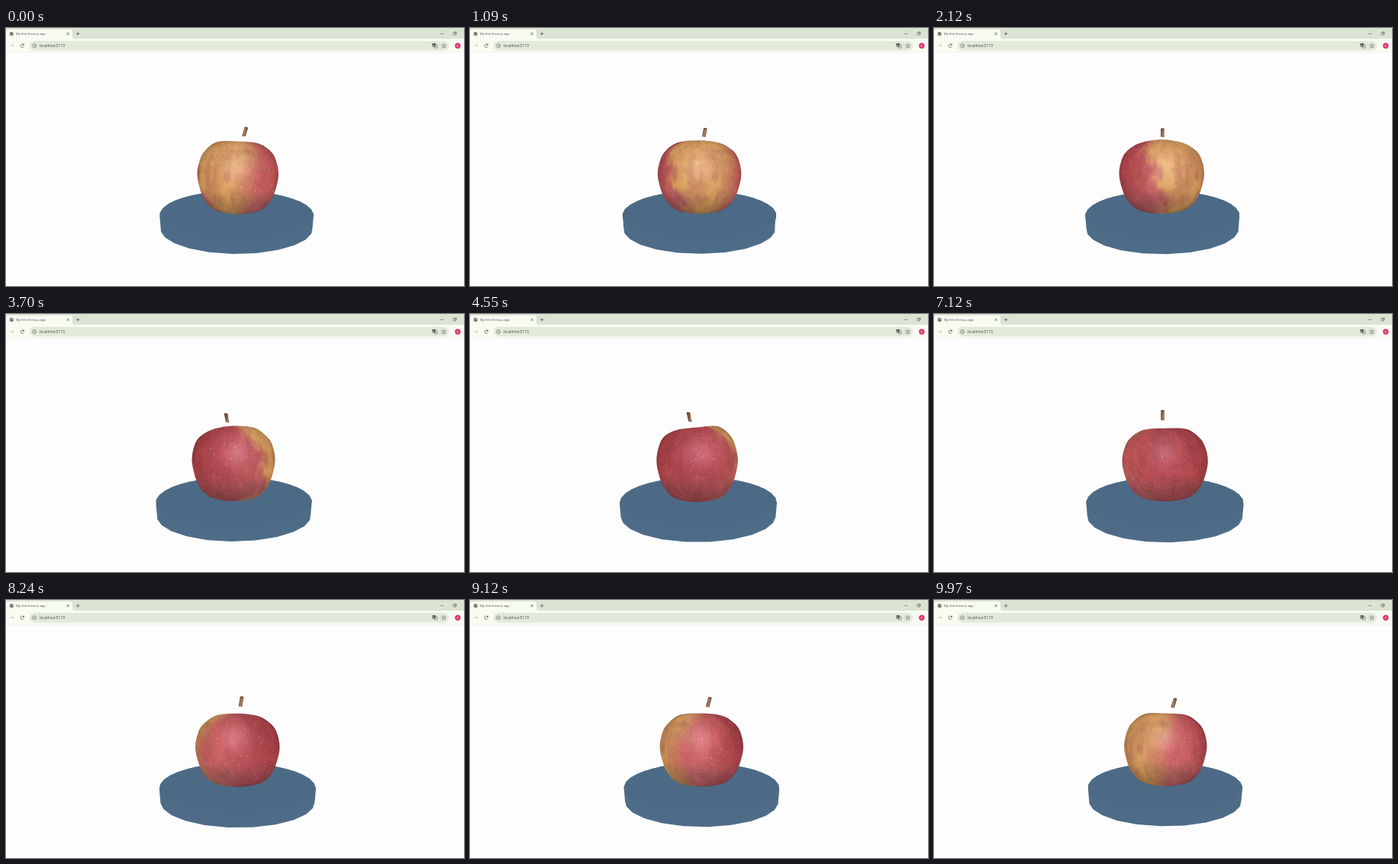
Write an HTML page with a canvas that moves like this. It is 600 px wide and 338 px high and loops after 10 s.

```html
<!DOCTYPE html>
<html lang="en">
<head>
<meta charset="utf-8">
<title>My first three.js app</title>
<style>
html, body { margin: 0; width: 100%; height: 100%; overflow: hidden; background: #fdfdfd; }
canvas, svg { position: absolute; left: 0; top: 0; width: 600px; height: 338px; display: block; }
text { font-family: "Open Sans", "Noto Sans", sans-serif; fill: #43473f; }
.line { fill: none; stroke: #474b43; stroke-width: .7; }
.thin { stroke-width: .55; }
</style>
</head>
<body>
<canvas id="scene" width="600" height="338"></canvas>
<svg viewBox="0 0 600 338">
  <rect width="600" height="15" fill="#dbe4d3"/>
  <rect y="14" width="600" height="17.5" fill="#f8fbf2"/>
  <path d="M0 14.5V4Q0 2 3 2H84Q87 2 87 5V11Q87 14 90 14.5Z" fill="#f8fbf2"/>
  <path d="M0 31.7H600" stroke="#e9ede4" stroke-width=".6"/>
  <rect x="31" y="17" width="549" height="12.4" rx="6.2" fill="#e1ead9"/>
  <circle cx="7.3" cy="7.5" r="2.5" fill="#4a4f48"/>
  <path d="M5.4 6.6L7 7.6 6.6 9.3M8 5.4L8.3 7 9.5 7.6" fill="none" stroke="#eef3e8" stroke-width=".9"/>
  <text x="13" y="9.3" font-size="4.2">My first three.js app</text>
  <path class="line" d="M79.3 5.8L82.7 9.2M82.7 5.8L79.3 9.2M92 7.5H96.4M94.2 5.3V9.7"/>
  <path class="line thin" d="M569 7.5H573M586 6.2H589V9H586ZM587 6V5.2H590V8H589.2"/>
  <path class="line" style="stroke:#b3b9ae" d="M5.6 23H10M8.2 21.2L10 23 8.2 24.8"/>
  <path class="line" d="M23.3 22.2A2.2 2.2 0 1 0 23.3 24.2M23.5 20.7V22.4H21.8"/>
  <circle class="line thin" cx="37.3" cy="23.2" r="2.4"/>
  <path class="line thin" d="M37.3 22.8V24.5M37.3 21.5V22.2"/>
  <text x="44" y="24.9" font-size="4.9">localhost:5173</text>
  <rect x="558.6" y="20" width="4" height="4.6" rx=".6" fill="#474b43"/>
  <rect class="line thin" x="561.6" y="21.8" width="3.2" height="4.2" rx=".5"/>
  <text x="559.3" y="23.5" font-size="3.4" style="fill:#e1ead9">A</text>
  <path class="line thin" d="M573.5 20.4L574.3 22.3 576.3 22.4 574.8 23.8 575.3 25.8 573.5 24.7 571.7 25.8 572.2 23.8 570.7 22.4 572.7 22.3Z"/>
  <circle cx="591.8" cy="23.2" r="3.7" fill="#e2336d"/>
  <text x="591.8" y="24.7" font-size="4" text-anchor="middle" style="fill:#fff">O</text>
</svg>
<script>
const LOOP = 10000, TAU = Math.PI * 2, DEG = Math.PI / 180;
const ctx = document.getElementById('scene').getContext('2d');
const clamp = (v, a = 0, b = 1) => Math.min(b, Math.max(a, v));
const mix = (a, b, k) => a + (b - a) * k;
const smooth = (a, b, v) => { const k = clamp((v - a) / (b - a)); return k * k * (3 - 2 * k); };

function makeCanvas(w, h) {
  const c = document.createElement('canvas');
  c.width = w;
  c.height = h;
  return c.getContext('2d', { willReadFrequently: true });
}

let seed = 7;
const rnd = () => (seed = (seed * 16807) % 2147483647) / 2147483647;

function hash(x, y) {
  const s = Math.sin(x * 127.1 + y * 311.7) * 43758.5453;
  return s - Math.floor(s);
}

// Value noise that wraps after `wrap` cells in x
function noise(x, y, wrap) {
  const ix = Math.floor(x), iy = Math.floor(y);
  const fx = smooth(0, 1, x - ix), fy = smooth(0, 1, y - iy);
  const at = (i, j) => hash((ix + i + wrap) % wrap, iy + j);
  return mix(mix(at(0, 0), at(1, 0), fx), mix(at(0, 1), at(1, 1), fx), fy);
}

// Apple skin, unrolled: longitude across, height down
const TW = 720, TH = 200;
function makeSkin() {
  const g = makeCanvas(TW, TH), img = g.createImageData(TW, TH);
  for (let y = 0; y < TH; y++) for (let x = 0; x < TW; x++) {
    const u = x / TW, v = y / TH, lon = u * 360 - 180;
    const blotch = noise(u * 18, v * 7, 18) - .5;
    const patch = noise(u * 44, v * 16, 44) - .5;
    const streak = noise(u * 80, v * 6, 80) - .5;
    const grain = noise(u * 180, v * 60, 180) - .5;
    const edge = lon + blotch * 26 + patch * 12 + streak * 8;
    const left = mix(-100, -72, smooth(.15, .7, v)), right = mix(42, 12, smooth(.1, .55, v));
    const yellow = smooth(left - 18, left + 18, edge) * (1 - smooth(right - 22, right + 24, edge));
    const pink = smooth(-150, -75, lon) * (1 - smooth(40, 110, lon));
    const ripe = clamp(yellow * (.86 + blotch * .4 + patch * .25 + streak * .2));
    const light = 1 + blotch * .1 + patch * .08 + streak * .05 + grain * .08;
    const pale = 14 * smooth(.5, .8, v);
    const red = [mix(174, 194, pink), mix(66, 88, pink) + pale, mix(72, 88, pink) + pale];
    const gold = [208, 150, 88];
    for (let c = 0; c < 3; c++) img.data[(y * TW + x) * 4 + c] = mix(red[c], gold[c], ripe) * light;
    img.data[(y * TW + x) * 4 + 3] = 255;
  }
  g.putImageData(img, 0, 0);
  for (let i = 0; i < 380; i++) {
    g.fillStyle = `rgba(232,180,155,${.15 + rnd() * .35})`;
    g.beginPath();
    g.ellipse(rnd() * TW, (.06 + rnd() * .88) * TH, 1.6, 1.2, 0, 0, TAU);
    g.fill();
  }
  return g.getImageData(0, 0, TW, TH).data;
}
const skin = makeSkin();

// time, left, right, top, bottom, then five drops along the upper rim
const poses = [
  [0, 250.5, 357, 147.3, 244, 13, 1.8, 1.3, 4, 14],
  [2120, 242.5, 354, 146, 243.3, 14.5, 4.5, .2, 4.5, 14.5],
  [3700, 243.5, 352.5, 145, 245.2, 15.5, 6.2, 1.5, 4, 15.5],
  [4550, 244.3, 351, 145.5, 246.5, 14.5, 6.5, 3, 1.6, 13],
  [6000, 245, 358, 147.3, 246, 14, 4.8, 3, 1.6, 13.5],
  [8240, 248, 358.5, 148.3, 245, 14, 3, .5, 4, 14.5],
  [9970, 249, 357.5, 147, 244, 13.5, 2.2, 1.5, 3.8, 14.5]
];
const rim = [.1, .25, .5, .75, .9];
const side = [[.968, .27], [1, .46], [.966, .66], [.908, .81], [.805, .93], [.66, .983]];

function poseAt(t) {
  let i = 0;
  while (i < poses.length - 2 && t > poses[i + 1][0]) i++;
  const a = poses[i], b = poses[i + 1], p = poses[i - 1] || a, n = poses[i + 2] || b;
  const d = b[0] - a[0], k = Math.min(1, (t - a[0]) / d), k2 = k * k, k3 = k2 * k;
  return a.map((v, j) => {
    const m0 = (b[j] - p[j]) / (b[0] - p[0]) * d, m1 = (n[j] - v) / (n[0] - a[0]) * d;
    return v + (b[j] - v) * (3 * k2 - 2 * k3) + m0 * (k3 - 2 * k2 + k) + m1 * (k3 - k2);
  });
}

function addPolygon(points) {
  points.forEach(([x, y], i) => i ? ctx.lineTo(x, y) : ctx.moveTo(x, y));
  ctx.closePath();
}

function fillPolygons(color, polygons) {
  ctx.fillStyle = color;
  ctx.beginPath();
  polygons.forEach(addPolygon);
  ctx.fill();
}

function traceCurve(pts) {
  const n = pts.length, at = i => pts[(i + n) % n];
  ctx.beginPath();
  ctx.moveTo(...pts[0]);
  for (let i = 0; i < n; i++) {
    const [p, a, b, q] = [at(i - 1), at(i), at(i + 1), at(i + 2)];
    ctx.bezierCurveTo(a[0] + (b[0] - p[0]) / 6, a[1] + (b[1] - p[1]) / 6,
      b[0] - (q[0] - a[0]) / 6, b[1] - (q[1] - a[1]) / 6, b[0], b[1]);
  }
  ctx.closePath();
}

function drawPlate(turn) {
  const R = 91, D = 200, N = 32;
  const ox = -2 * Math.cos((turn - 140) * DEG), oz = 2 * Math.cos((turn - 230) * DEG);
  const top = [], low = [], walls = [];
  for (let i = 0; i < N; i++) {
    const a = (turn - 228.5 + i * 360 / N) * DEG;
    const s = D / (D - oz - R * Math.cos(a));
    const x = (ox + R * Math.sin(a)) * s, y = 174.2 + 57.5 * s;
    top.push([301 + x, y]);
    low.push([301 + x * .985, y + 18]);
  }
  for (let i = 0; i < N; i++) {
    const j = (i + 1) % N;
    if (top[j][0] > top[i][0]) walls.push([top[i], top[j], low[j], low[i]]);
  }
  fillPolygons('#4e6c88', [...walls, top]);
  fillPolygons('#4c6a86', [top]);
}

const BW = 124, BH = 112;
const ball = makeCanvas(BW, BH), shade = ball.createImageData(BW, BH);

function drawApple(t, spin) {
  const [, left, right, up, down, ...drops] = poseAt(t);
  const w = right - left, h = down - up, cx = (left + right) / 2, cy = (up + down) / 2;
  const x0 = Math.floor(left) - 3, y0 = Math.floor(up) - 3;
  const px = shade.data, tint = [.8, 1.15, 1.35];
  for (let j = 0; j < BH; j++) {
    const y = y0 + j + .5, ny = clamp((y - cy) / (h / 2), -.995, .995);
    const half = Math.pow(1 - Math.pow(Math.abs(ny), 2.4), 1 / 2.4);
    const row = Math.floor((.5 + Math.asin(ny) / Math.PI) * (TH - 1)) * TW;
    for (let i = 0; i < BW; i++) {
      const x = x0 + i + .5, nx = (x - cx) / (w / 2);
      const lon = Math.asin(clamp(nx / half, -1, 1)) / TAU * 360 - spin + 180;
      const s = (row + Math.floor(((lon % 360) + 360) % 360 / 360 * TW) % TW) * 4;
      const r = Math.pow(Math.abs(nx), 2.4) + Math.pow(Math.abs(ny), 2.4);
      const z = Math.sqrt(clamp(1 - r));
      const lit = (.76 + .23 * Math.pow(z, .7)) * (1 - .2 * smooth(.2, 1, ny));
      const dx = x - 302, dy = y - 182, d2 = dx * dx + dy * dy;
      const glow = 20 * Math.exp(-d2 / 260) + 16 * Math.exp(-d2 / 1300);
      const o = (j * BW + i) * 4;
      for (let c = 0; c < 3; c++) px[o + c] = skin[s + c] * lit + glow * tint[c];
      px[o + 3] = 255;
    }
  }
  ball.putImageData(shade, 0, 0);

  const at = ([x, y]) => [left + x * w, up + y * h];
  const outline = [
    ...rim.map((x, i) => [left + x * w, up + drops[i]]),
    ...side.map(at), at([.5, 1]),
    ...side.map(([x, y]) => at([1 - x, y])).reverse()
  ];
  ctx.save();
  traceCurve(outline);
  ctx.clip();
  ctx.drawImage(ball.canvas, x0, y0);
  ctx.restore();
}

function drawStem(turn) {
  const c = Math.cos(turn * DEG), s = Math.sin(turn * DEG);
  const bx = 300.5 + 12 * c, by = 141 + 1.8 * s, tx = 301 + 15 * c, ty = 128.8 + 2.8 * s;
  const g = ctx.createLinearGradient(bx - 2.5, by, bx + 2.5, by + 1);
  g.addColorStop(0, '#75523f');
  g.addColorStop(.5, '#ad8363');
  g.addColorStop(1, '#68483a');
  fillPolygons(g, [[[bx - 2.3, by - .3], [tx - 2.4, ty + .5], [tx + 2.4, ty + .5], [bx + 2.2, by + .5]]]);
  ctx.fillStyle = '#69513f';
  ctx.beginPath();
  ctx.ellipse(tx, ty + .7, 2.4, 1, .15, 0, TAU);
  ctx.fill();
}

function draw(now) {
  const t = now % LOOP, spin = t * .0338, turn = spin + 24;
  ctx.fillStyle = '#fdfdfd';
  ctx.fillRect(0, 0, 600, 338);
  drawPlate(turn);
  drawApple(t, spin);
  drawStem(turn);
}

const start = performance.now();
function tick() {
  draw(performance.now() - start);
  requestAnimationFrame(tick);
}
tick();
</script>
</body>
</html>
```
